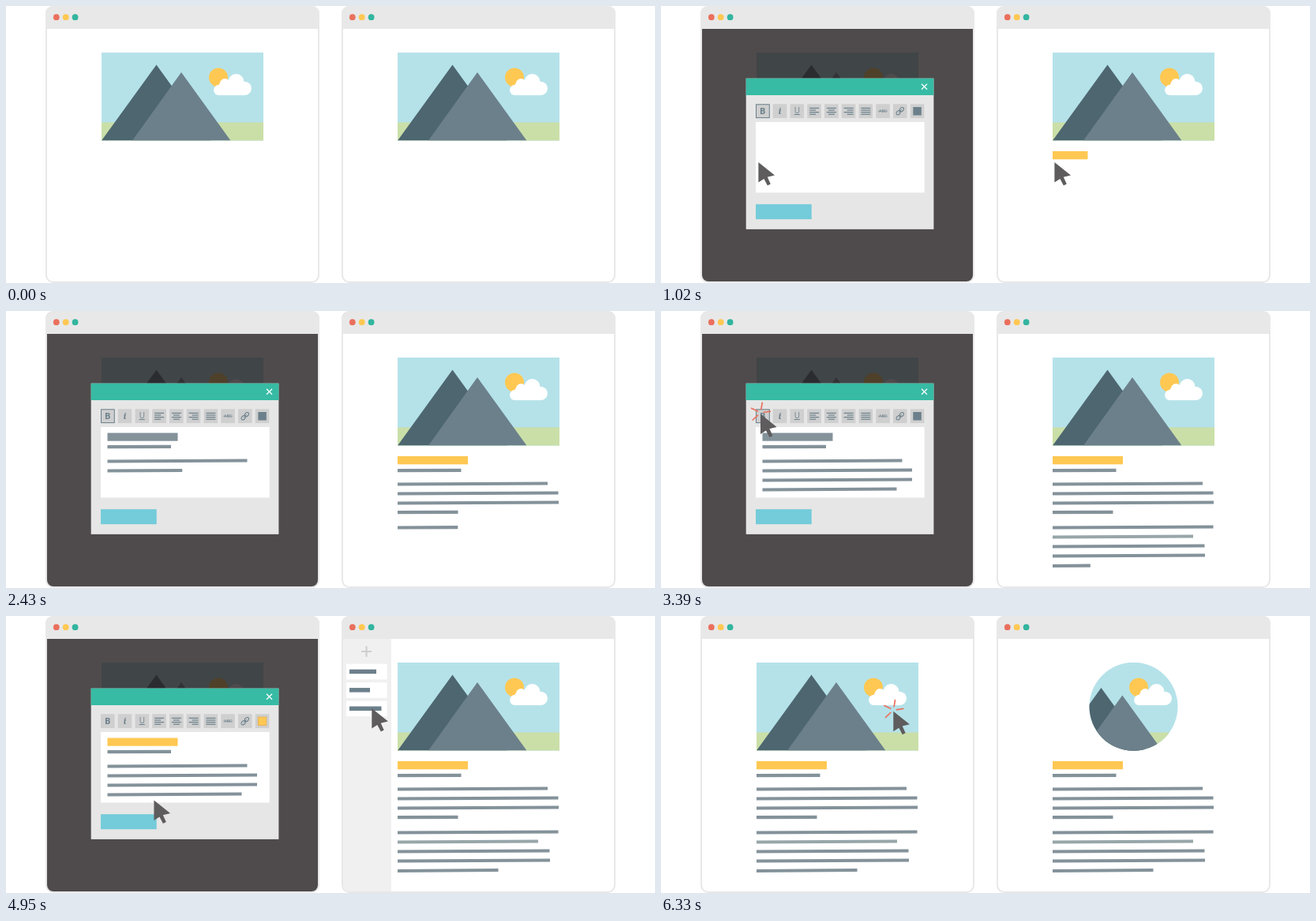
Write an HTML page with a canvas that moves like this. It is 822x351 px and loops after 8 s.

```html
<!DOCTYPE html>
<html lang="en">
<head>
<meta charset="utf-8">
<title>Page editor comparison</title>
<style>
  html, body { margin: 0; width: 100%; height: 100%; overflow: hidden; background: #fff; }
  canvas { display: block; width: 822px; height: 351px; }
</style>
</head>
<body>
<canvas id="stage"></canvas>
<script>
const WIDTH = 822, HEIGHT = 351, LOOP = 8000, STEP = 30, REST = 6330;
const OFFSET = 375; // distance between the two windows
const LINE_TIME = 240;
const canvas = document.getElementById('stage');
const ratio = window.devicePixelRatio || 1;
canvas.width = WIDTH * ratio;
canvas.height = HEIGHT * ratio;
const ctx = canvas.getContext('2d');

const color = {
  frame: '#e8e8e8', red: '#ea705d', yellow: '#ffc853', green: '#33b59f', teal: '#37bba4',
  sky: '#b5e2e9', grass: '#cadfa8', darkRock: '#4d6670', rock: '#6c808b',
  text: '#84929a', paleText: '#98a6a9', cursor: '#5e5c5d', button: '#cfcfcf',
  blue: '#74cbd9', panel: '#e6e6e6', sidebar: '#f0f0f0', ink: '#231f20'
};

// Text rows: y, width
const pageRows = [[202, 80.5], [219, 190], [231, 203.5], [243, 204], [255, 76.5],
  [274, 203.5], [286, 178], [298, 192.5], [310, 193], [322.5, 127.5]];
const modalRows = [[172, 80.5], [190, 177], [202, 189.5], [214, 189.5], [226, 170]];

const clamp = v => Math.max(0, Math.min(1, v));
const span = (t, from, to) => clamp((t - from) / (to - from));
const mix = (a, b, k) => a + (b - a) * k;
const visible = (t, from, to, fade = 120) => span(t, from, from + fade) * (1 - span(t, to, to + fade));

function box(x, y, w, h, fill) {
  ctx.fillStyle = fill;
  ctx.fillRect(x, y, w, h);
}

function disc(x, y, r, fill) {
  ctx.fillStyle = fill;
  ctx.beginPath();
  ctx.arc(x, y, r, 0, Math.PI * 2);
  ctx.fill();
}

function polygon(points, fill) {
  ctx.fillStyle = fill;
  ctx.beginPath();
  points.forEach(([x, y]) => ctx.lineTo(x, y));
  ctx.closePath();
  ctx.fill();
}

function stroke(x1, y1, x2, y2, width, style) {
  ctx.strokeStyle = style;
  ctx.lineWidth = width;
  ctx.beginPath();
  ctx.moveTo(x1, y1);
  ctx.lineTo(x2, y2);
  ctx.stroke();
}

function layer(alpha, draw) {
  if (alpha <= 0) return;
  ctx.save();
  ctx.globalAlpha *= alpha;
  draw();
  ctx.restore();
}

function drawWindow() {
  ctx.fillStyle = '#fff';
  ctx.strokeStyle = color.frame;
  ctx.lineWidth = 2;
  ctx.beginPath();
  ctx.roundRect(51, 1, 345, 349, 9);
  ctx.fill();
  ctx.stroke();
  ctx.fillStyle = color.frame;
  ctx.beginPath();
  ctx.roundRect(50, 0, 347, 29, [9, 9, 0, 0]);
  ctx.fill();
  [color.red, color.yellow, color.green].forEach((c, i) => disc(63.8 + i * 11.9, 14.2, 3.9, c));
}

function clipPage() {
  ctx.beginPath();
  ctx.roundRect(52, 29, 343, 320, [0, 0, 8, 8]);
  ctx.clip();
}

function mountain(peakX, peakY, left, right, base, fill) {
  polygon([[left, base], [peakX, peakY], [right, base]], fill);
}

function drawScenery(round) {
  ctx.save();
  ctx.beginPath();
  if (round) ctx.arc(223.5, 114.8, 56, 0, Math.PI * 2);
  else ctx.rect(121, 59, 205, 111.5);
  ctx.clip();
  box(121, 59, 205, 112, color.sky);
  box(121, 147.5, 205, 24, color.grass);
  const [m1, m2, drop] = round ? [-8, -12.7, 16.5] : [0, 0, 0];
  mountain(190.5 + m1, 74.5 + drop, 121 + m1, 260 + m1, 170.5 + drop, color.darkRock);
  mountain(222 + m2, 84 + drop, 160 + m2, 284.5 + m2, 170.5 + drop, color.rock);
  if (round) ctx.translate(-39, 0);
  disc(269, 90.5, 12, color.yellow);
  disc(291.5, 96, 10, '#fff');
  disc(277.3, 98.5, 6.5, '#fff');
  disc(269.8, 106.4, 6.7, '#fff');
  disc(302.2, 104.4, 8.7, '#fff');
  box(270, 98, 32, 15.1, '#fff');
  ctx.restore();
}

// Each row is written in turn, starting at the given time.
function drawRows(x, rows, t, start) {
  rows.forEach(([y, full], i) => {
    const k = span(t, start + i * LINE_TIME, start + (i + 1) * LINE_TIME);
    if (!k) return;
    const tilt = full > 100 ? 0.5 : 0.1;
    stroke(x, y + tilt, x + full * k, y + tilt - 2 * tilt * k, 4.2, y === 286 ? color.paleText : color.text);
  });
}

function drawPageText(t, start) {
  box(121, 184, 89 * span(t, start, start + LINE_TIME), 10.3, color.yellow);
  drawRows(121, pageRows, t, start + LINE_TIME);
}

function glyph(text, x, y, font) {
  ctx.font = font;
  ctx.fillStyle = color.rock;
  ctx.fillText(text, x, y);
}

function drawToolbar(t) {
  const recolored = t >= 4230;
  const slot = i => 120 + 21.75 * i;
  for (let i = 0; i < 10; i++) box(slot(i), 124.3, 17.6, 17.8, color.button);
  if (!recolored) {
    ctx.strokeStyle = color.rock;
    ctx.lineWidth = 1;
    ctx.strokeRect(120.5, 124.8, 16.8, 16.8);
  }
  ctx.textAlign = 'center';
  glyph('B', 128.7, 137.2, 'bold 11px "Open Sans", sans-serif');
  glyph('i', 150.5, 137, 'italic bold 11px "Noto Serif", serif');
  glyph('U', 172.3, 136, '10px "Open Sans", sans-serif');
  stroke(168.7, 137.5, 175.8, 137.5, 1, color.rock);
  glyph('ABC', 281.2, 135, '5.5px "Open Sans", sans-serif');
  stroke(275.3, 133.2, 287, 133.2, 0.7, color.rock);

  [0, 0.5, 1, 0].forEach((align, i) => {
    for (let row = 0; row < 4; row++) {
      const w = i < 3 && row % 2 ? 8 : 12;
      const x = slot(i + 3) + 2.9 + (12 - w) * align;
      stroke(x, 129.4 + row * 2.6, x + w, 129.4 + row * 2.6, 1.2, color.rock);
    }
  });

  ctx.strokeStyle = color.rock;
  ctx.lineWidth = 1.1;
  for (const [x, y] of [[300.7, 135.2], [304.8, 131.2]]) {
    ctx.beginPath();
    ctx.ellipse(x, y, 3.1, 2.2, -Math.PI / 4, 0, Math.PI * 2);
    ctx.stroke();
  }
  stroke(300.8, 135.2, 304.8, 131.2, 1, color.rock);

  box(319.3, 128, 10.5, 10.5, recolored ? color.yellow : color.rock);
  if (recolored) {
    ctx.strokeStyle = '#e5ae4d';
    ctx.lineWidth = 0.8;
    ctx.strokeRect(319.3, 128, 10.5, 10.5);
  }
}

function drawModal(t) {
  box(107.7, 91.7, 237.7, 191.2, color.panel);
  box(107.7, 91.7, 237.7, 21.3, color.teal);
  stroke(330, 98.8, 337, 105.8, 1.3, '#fff');
  stroke(337, 98.8, 330, 105.8, 1.3, '#fff');
  drawToolbar(t);
  box(120, 147, 213.6, 89.5, '#fff');
  box(120, 251.2, 70.7, 19, color.blue);
  layer(1 - span(t, 5190, 5310), () => {
    box(128.5, 154.5, 89 * span(t, 1530, 1770), 10.2, t < 4230 ? color.text : color.yellow);
    drawRows(128.5, modalRows, t, 1830);
  });
}

function drawSidebar(t) {
  const shown = span(t, 4110, 4410) - span(t, 5388, 5688);
  if (shown <= 0) return;
  ctx.save();
  clipPage();
  ctx.translate(-61 * (1 - shown), 0);
  box(52, 29, 61, 320, color.sidebar);
  stroke(75, 45, 88, 45, 2.2, '#cfcfcf');
  stroke(81.5, 38.3, 81.5, 51.7, 2.2, '#cfcfcf');
  [34, 26, 40.5].forEach((w, i) => {
    const y = 60.7 + 23.4 * i;
    box(56, y, 51.5, 19.7, '#fff');
    if (i === 2 && t >= 5040) {
      ctx.strokeStyle = '#b4bec3';
      ctx.lineWidth = 1;
      ctx.strokeRect(56, y + 0.3, 51, 19);
    }
    box(60, y + 7, w, 5.5, color.rock);
  });
  ctx.restore();
}

// Keys: time, x, y
function along(keys, t) {
  const next = keys.findIndex(key => key[0] > t);
  if (next === 0) return keys[0].slice(1);
  if (next < 0) return keys[keys.length - 1].slice(1);
  const [a, b] = [keys[next - 1], keys[next]];
  const k = span(t, a[0], b[0]);
  return [mix(a[1], b[1], k), mix(a[2], b[2], k)];
}

function drawRays(grow) {
  const rays = [[-3, -3.2, -12, -7.6], [0.8, -5.5, 2.3, -14.8], [3.5, -2, 13, -3.4], [-3, 1.2, -10.3, 8]];
  for (const [x1, y1, x2, y2] of rays) {
    stroke(x1, y1, mix(x1, x2, grow), mix(y1, y2, grow), 1.7, color.red);
  }
}

function drawCursor(t, keys, alpha, clicks) {
  layer(alpha, () => {
    ctx.translate(...along(keys, t));
    for (const start of clicks) {
      if (t > start && t < start + 210) drawRays(span(t, start, start + 60));
    }
    polygon([[0, 0], [0, 25.5], [7, 21], [11.5, 29.5], [15.4, 27.5], [11.4, 18.8], [20.6, 16.5]], color.cursor);
  });
}

const opening = [[0, 123.4, 198]];
const leftPath = [[3000, 298, 220], [3300, 126, 130.5], [3690, 126, 130.5], [4065, 320, 130],
  [4650, 320, 130], [5025, 154.3, 259.3], [5880, 154.3, 259.3], [6255, 294.3, 120.8]];
const rightPath = [[3600, 248, 313], [3960, 297.5, 170], [4585, 297.5, 170], [4965, 79.7, 114.7]];

function drawLeft(t) {
  drawWindow();
  drawScenery(false);
  if (t >= 5190) drawPageText(LOOP, 0);
  const shade = t < 3000 ? span(t, 600, 1000) : 1 - span(t, 5250, 5610);
  const modal = t < 3000 ? span(t, 600, 1000) : 1 - span(t, 5310, 5710);
  layer(shade * 0.8, () => {
    clipPage();
    box(52, 29, 343, 320, color.ink);
  });
  layer(modal, () => drawModal(t));
  drawCursor(t, opening, visible(t, 180, 1110), [420]);
  drawCursor(t, leftPath, span(t, 2940, 3030), [3300, 4110, 5040, 6240]);
}

function drawRight(t) {
  drawWindow();
  const rounded = span(t, 5130, 5340);
  layer(1 - rounded, () => drawScenery(false));
  layer(rounded, () => drawScenery(true));
  drawPageText(t, 900);
  drawSidebar(t);
  drawCursor(t, opening, visible(t, 180, 1110), [420]);
  drawCursor(t, rightPath, visible(t, 3510, 5900), [3990, 4980]);
}

function render(now) {
  const t = Math.min(REST, Math.floor((now % LOOP) / STEP) * STEP);
  ctx.setTransform(ratio, 0, 0, ratio, 0, 0);
  box(0, 0, WIDTH, HEIGHT, '#fff');
  drawLeft(t);
  ctx.save();
  ctx.translate(OFFSET, 0);
  drawRight(t);
  ctx.restore();
}

const begin = performance.now();
function tick() {
  render(performance.now() - begin);
  requestAnimationFrame(tick);
}
tick();
</script>
</body>
</html>
```
